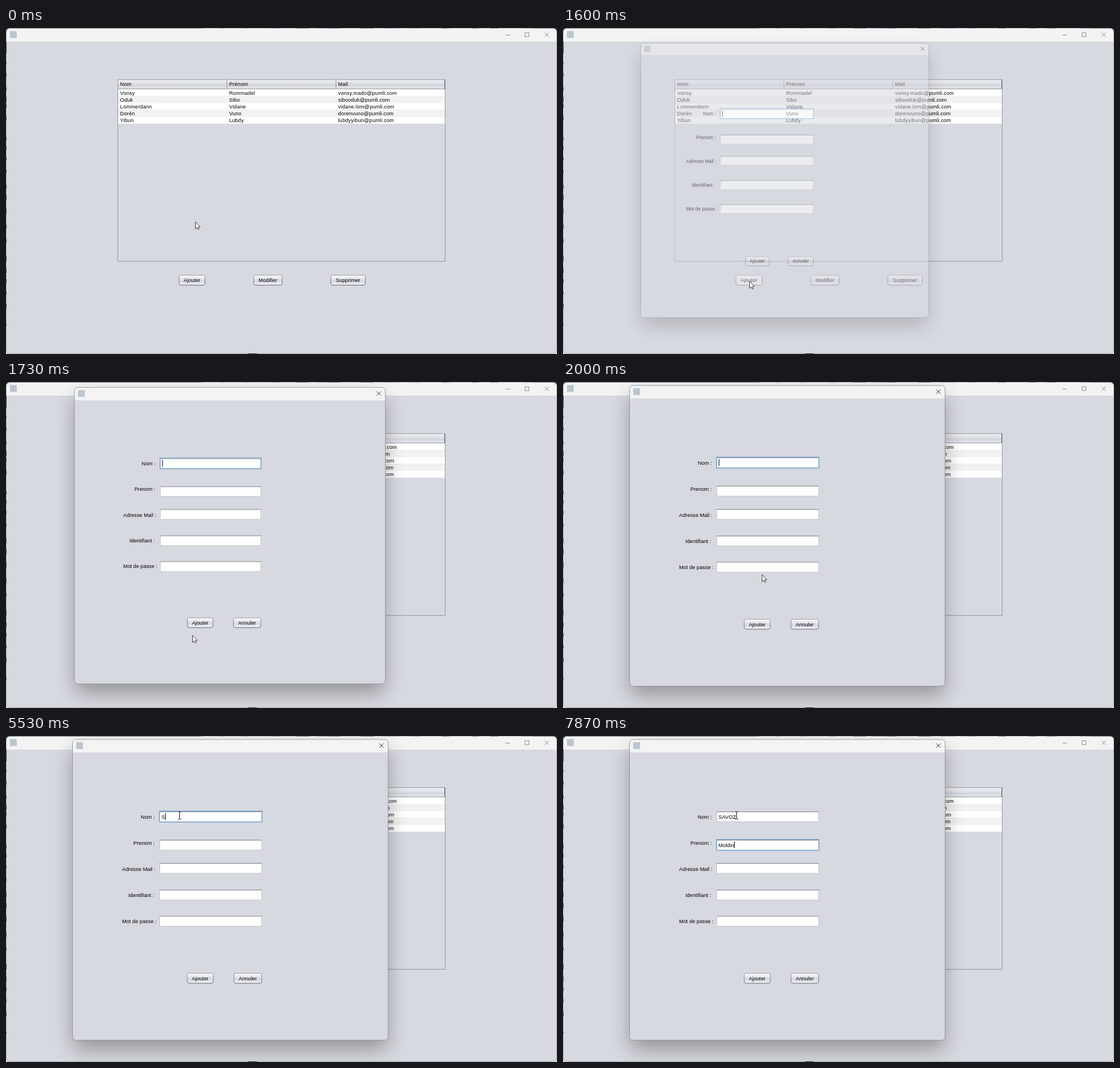
Recreate the animation shown at these times as an HTML page. Size 973x575 px, loop 8 s.

```html
<!DOCTYPE html>
<html lang="fr">
<head>
<meta charset="utf-8">
<title>Gestion des contacts</title>
<style>
  html, body { margin: 0; width: 100%; height: 100%; overflow: hidden; background: #d6d9df; }
  svg { display: block; width: 973px; height: 575px; }
  text { font: 9.2px "Liberation Sans", Arial, sans-serif; fill: #000; letter-spacing: .05px; white-space: pre; }
  .table text { letter-spacing: .18px; }
  .mid { text-anchor: middle; }
</style>
</head>
<body>
<svg viewBox="0 0 973 575" xmlns="http://www.w3.org/2000/svg">
  <defs>
    <linearGradient id="btn" x2="0" y2="1">
      <stop offset="0" stop-color="#fafbfc"/><stop offset=".5" stop-color="#dadde3"/>
      <stop offset=".6" stop-color="#d6d9df"/><stop offset="1" stop-color="#eff2f7"/>
    </linearGradient>
    <linearGradient id="hover" x2="0" y2="1">
      <stop offset="0" stop-color="#fff"/><stop offset=".5" stop-color="#eceef2"/>
      <stop offset="1" stop-color="#fbfcfe"/>
    </linearGradient>
    <linearGradient id="edge" x2="0" y2="1">
      <stop offset="0" stop-color="#9a9da3"/><stop offset="1" stop-color="#5c6067"/>
    </linearGradient>
    <linearGradient id="head" x2="0" y2="1">
      <stop offset="0" stop-color="#eff1f4"/><stop offset=".5" stop-color="#d9dce2"/>
      <stop offset=".55" stop-color="#d1d4db"/><stop offset="1" stop-color="#e4e7ec"/>
    </linearGradient>
    <filter id="blur" x="-30%" y="-30%" width="160%" height="160%">
      <feGaussianBlur stdDeviation="18"/>
    </filter>
  </defs>
  <g id="main"></g>
  <g id="dialog"></g>
  <path id="arrow" d="M.5.8V13.2L3.3 10.6 5.1 14.5 7 13.6 5.3 9.8H9Z" fill="#fff" stroke="#111" stroke-width=".8"/>
  <path id="beam" d="M-3-6.5H-1Q0-6.5 0-5.5Q0-6.5 1-6.5H3M0-5.5V5.5M-3 6.5H-1Q0 6.5 0 5.5Q0 6.5 1 6.5H3" fill="none" stroke="#111"/>
</svg>
<script>
const $ = id => document.getElementById(id);
const show = (el, on) => el.style.display = on ? '' : 'none';

let seed = 7;
const random = () => (seed = seed * 16807 % 2147483647) / 2147483647;

const rect = (x, y, w, h, fill, more = '') =>
  `<rect x="${x}" y="${y}" width="${w}" height="${h}" fill="${fill}" ${more}/>`;
const line = (d, color, width = 1) =>
  `<path d="${d}" fill="none" stroke="${color}" stroke-width="${width}"/>`;
const text = (x, y, s, more = '') => `<text x="${x}" y="${y}" ${more}>${s}</text>`;
const cross = (x, y, color) => line(`M${x} ${y}l7.4 7.4m0-7.4l-7.4 7.4`, color, .9);
const icon = (x, y) => rect(x, y, 12, 12, '#bcc5cf');
const titleBar = (x, y, w, h) =>
  `<path d="M${x} ${y + h}v${6 - h}q0-6 6-6h${w - 12}q6 0 6 6v${h - 6}z" fill="#f3f3f3"/>`;

const button = (x, y, w, label, id = '') =>
  rect(x, y + .9, w, 18, '#f0f2f5', 'rx="4" opacity=".6"') +
  rect(x + .5, y + .5, w - 1, 17.6, 'url(#btn)', `rx="3.5" stroke="url(#edge)" ${id && `id="${id}"`}`) +
  text(x + w / 2, y + 12.7, label, 'class="mid"');

const rows = [
  ['Vonsy', 'Rommadel', 'vonsy.mado@pumli.com'],
  ['Oduk', 'Sibo', 'sibooduk@pumli.com'],
  ['Lommerdann', 'Vidane', 'vidane.lom@pumli.com'],
  ['Dorén', 'Vuno', 'dorenvuno@pumli.com'],
  ['Yibun', 'Lubdy', 'lubdyyibun@pumli.com']
];

// Slivers of the windows behind, along the top and left edges
function backdrop() {
  let s = rect(0, 0, 973, 575, '#e4e5e7') + rect(0, 0, 344, 8, '#303133') + rect(930, 0, 43, 45, '#303133');
  for (let x = 344; x < 930; x += 20 + random() * 40)
    s += rect(x, 0, 5 + random() * 22, 1, random() < .5 ? '#333' : '#8b8d91');
  return s;
}

function leftTicks() {
  let s = rect(0, 24, 1, 21, '#303133');
  for (let y = 60; y < 540; y += 12 + random() * 26) s += rect(0, y, 1, 3 + random() * 7, '#3a3c40');
  return s;
}

function mainWindow() {
  let s = backdrop() + rect(.5, .9, 972, 573.4, '#d6d9df', 'rx="6" stroke="#a3a6ab"');
  s += titleBar(1, 1, 971, 23) + leftTicks() + rect(427, 574, 16, 1, '#222') + icon(7, 5.5);
  s += line('M882 12.5h7.6M916.5 8.2h7v7h-7z', '#808080', .9) + cross(951.2, 8.2, '#808080');

  const rowH = 12.15, colX = c => 201.6 + c * 192.4;
  s += '<g class="table">' + rect(198, 91, 577, 17, 'url(#head)');
  s += line('M198 107.5H775M390 92V107M582.7 92V107', '#9297a1');
  ['Nom', 'Prénom', 'Mail'].forEach((h, c) => s += text(colX(c), 102.4, h));
  rows.forEach((row, i) => {
    s += rect(198, 108 + i * rowH, 577, rowH, i % 2 ? '#f2f2f2' : '#fff');
    row.forEach((v, c) => s += text(colX(c), 117.8 + i * rowH, v));
  });
  s += rect(197.5, 91, 578, 320.5, 'none', 'stroke="#9297a1"') + line('M774.6 91V107.5', '#6b7079') + '</g>';
  return s + button(305, 435.5, 47, 'Ajouter', 'add') + button(437, 435.5, 51, 'Modifier') +
    button(573, 435.5, 62, 'Supprimer');
}

// Label, its left edge, top of the field
const fields = [
  ['Nom :', 238, 133], ['Prenom :', 225, 183], ['Adresse Mail :', 205, 224],
  ['Identifiant :', 216, 271], ['Mot de passe :', 205, 317.4]
];

function dialogWindow() {
  let s = rect(119, 24, 554, 528, '#000', 'rx="8" opacity=".32" filter="url(#blur)"');
  s += rect(117.5, 6, 557.3, 530.7, '#d6d9df', 'rx="6"') + titleBar(117.5, 6, 557.3, 23);
  s += rect(117.5, 6, 557.3, 530.7, 'none', 'rx="6" stroke="#8e9196" stroke-width=".9"');
  s += icon(124, 11) + cross(659.3, 13.2, '#222');
  fields.forEach(([label, x, top], i) => {
    s += text(x, 145.7 + i * 46, label);
    s += rect(271.5, top + .5, 180, 17.6, '#fff', 'stroke="#c3c5c9"');
    s += line(`M271 ${top + .5}H452`, '#8c8e92') + line(`M272 ${top + 1.5}H451`, '#dedfe1');
  });
  s += rect(271, 132.5, 181, 19.2, 'none', 'id="focus" stroke="#7aa5cd" stroke-width="1.5"');
  s += text(274.6, 145.8, '', 'id="in0"') + text(274.6, 195.8, '', 'id="in1"');
  s += rect(275, 136, 1, 12, '#000', 'id="caret"');
  return s + button(319.5, 418, 47, 'Ajouter') + button(402, 418, 50, 'Annuler');
}

$('main').innerHTML = mainWindow();
$('dialog').innerHTML = dialogWindow();

// Pointer stops: step, x, y
const stops = [
  [0, 334, 341], [1, 334, 355], [4, 334, 355], [11, 330, 476], [15, 329, 443],
  [26, 329, 446], [30, 351, 339], [35, 316, 186], [40, 306, 140]
];
// Typing bursts: start, time per letter, field, letters
const bursts = [[1579, 0, 0, ''], [5530, 100, 0, 'SAVOZ'], [6400, 0, 1, ''], [7330, 140, 1, 'Mo'], [7730, 45, 1, 'ldin']];

function pointerAt(k) {
  const i = stops.findIndex(p => p[0] > k);
  if (i < 0) return stops[stops.length - 1].slice(1);
  const a = stops[i - 1], b = stops[i];
  const u = (1 - Math.cos(Math.PI * (k - a[0]) / (b[0] - a[0]))) / 2;
  return [1, 2].map(c => Math.round(a[c] + (b[c] - a[c]) * u));
}

function typingAt(now) {
  const state = { texts: ['', ''], field: 0, since: bursts[0][0] };
  for (const [start, step, field, letters] of bursts) {
    if (now < start) break;
    const n = step ? Math.min(letters.length, 1 + Math.floor((now - start) / step)) : 0;
    state.texts[field] += letters.slice(0, n);
    state.field = field;
    state.since = start + Math.max(0, n - 1) * step;
  }
  return state;
}

function drawPointer(k, open) {
  const [x, y] = pointerAt(k);
  const inField = open && x > 271 && x < 452 && fields.some(f => y > f[2] && y < f[2] + 18);
  const onAdd = x > 305 && x < 352 && y > 436 && y < 454;
  $('add').setAttribute('fill', onAdd ? 'url(#hover)' : 'url(#btn)');
  $('arrow').setAttribute('transform', `translate(${x} ${y})`);
  $('beam').setAttribute('transform', `translate(${x + .5} ${y})`);
  show($('arrow'), !inField);
  show($('beam'), inField);
}

function drawDialog(k, now) {
  const scale = 1 - .088 * .41 ** (k - 24);
  $('dialog').setAttribute('opacity', Math.min(1, .1 + .43 * (k - 23) + .04 * (k > 24)));
  $('dialog').setAttribute('transform', `translate(345 243) scale(${scale}) translate(-345 -243)`);

  const { texts, field, since } = typingAt(now);
  texts.forEach((s, i) => $('in' + i).textContent = s);
  const width = texts[field] ? $('in' + field).getComputedTextLength() : 0;
  $('caret').setAttribute('x', Math.round(274.8 + width));
  $('caret').setAttribute('y', 136 + field * 50);
  show($('caret'), Math.floor((now - since) / 505) % 2 === 0);
  $('focus').setAttribute('transform', `translate(0 ${field * 50})`);
}

function draw(t) {
  // The picture advances 15 times per second.
  const k = Math.floor((t + 3.4) * .015), now = Math.round(k * 20 / 3) * 10;
  const open = k >= 23;
  drawPointer(k, open);
  show($('dialog'), open);
  if (open) drawDialog(k, now);
}

const start = performance.now();
function tick() {
  draw((performance.now() - start) % 8000);
  requestAnimationFrame(tick);
}
tick();
</script>
</body>
</html>
```
